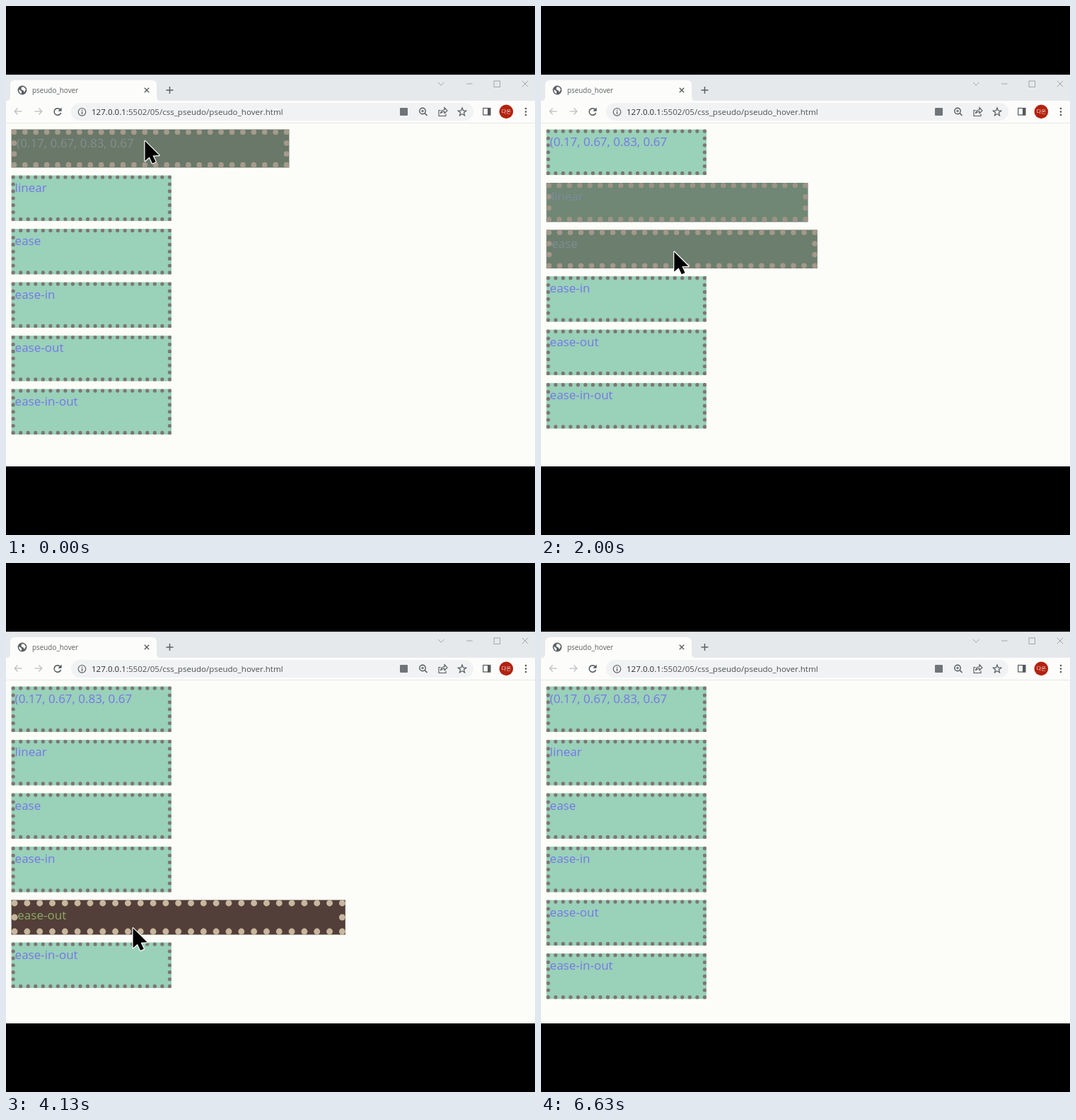
Recreate the animation shown at these times as an HTML page with a canvas. Size 748 by 748 pixels, loop 6.66 s.

```html
<!DOCTYPE html>
<html lang="en">
<head>
<meta charset="utf-8">
<title>pseudo_hover</title>
<style>
html, body { margin: 0; width: 100%; height: 100%; overflow: hidden; background: #000; }
canvas { display: block; width: 748px; height: 748px; }
</style>
</head>
<body>
<canvas id="stage" width="748" height="748"></canvas>
<script>
const ctx = document.getElementById('stage').getContext('2d');
const LOOP = 6660, STEP = 100 / 3, DURATION = 1450;
const SANS = '"Open Sans", "Noto Sans", sans-serif';

// label, timing curve, hover start, hover end
const boxes = [
  ['(0.17, 0.67, 0.83, 0.67', [0.17, 0.67, 0.83, 0.67], -402, 545],
  ['linear', [0, 0, 1, 1], 567, 1575],
  ['ease', [0.25, 0.1, 0.25, 1], 1617, 2449],
  ['ease-in', [0.42, 0, 1, 1], 2476, 3402],
  ['ease-out', [0, 0, 0.58, 1], 3403, 4345],
  ['ease-in-out', [0.42, 0, 0.58, 1], 4350, 5382]
];

// pointer height over time
const trail = [
  [0, 191], [400, 201], [545, 224], [570, 236], [800, 268], [1330, 271],
  [1480, 277], [1578, 298], [1620, 311], [1850, 346], [2300, 351], [2452, 371],
  [2490, 383], [2570, 413.5], [2750, 425], [3250, 431], [3402, 456], [3410, 467],
  [3570, 515.5], [4250, 516.5], [4345, 525], [4600, 565], [4770, 567],
  [5200, 568], [5385, 599], [5450, 656]
];

const lerp = (a, b, k) => a + (b - a) * k;

function bezier([x1, y1, x2, y2], x) {
  if (x <= 0) return 0;
  if (x >= 1) return 1;
  const at = (a, b, s) => 3 * (1 - s) * (1 - s) * s * a + 3 * (1 - s) * s * s * b + s * s * s;
  let lo = 0, hi = 1;
  for (let i = 0; i < 24; i++) {
    const mid = (lo + hi) / 2;
    if (at(x1, x2, mid) < x) lo = mid; else hi = mid;
  }
  return at(y1, y2, lo);
}

// transition value, with the shortened way back after an interruption
function progress([, curve, start, end], t) {
  const rise = bezier(curve, (Math.min(t, end) - start) / DURATION);
  if (t <= end) return rise;
  return rise * (1 - bezier(curve, (t - end) / (DURATION * rise)));
}

// blend two colours, each channel with its own power of p
function mix(from, to, p, powers) {
  const c = from.map((v, i) => Math.round(Math.max(0, Math.min(255, lerp(v, to[i], p ** powers[i])))));
  return `rgb(${c})`;
}

function rect(x, y, w, h, color) {
  ctx.fillStyle = color;
  ctx.fillRect(x, y, w, h);
}

function pill(x, y, w, h, r, color) {
  ctx.fillStyle = color;
  ctx.beginPath();
  ctx.roundRect(x, y, w, h, r);
  ctx.fill();
}

function disc(x, y, r, color) {
  ctx.fillStyle = color;
  ctx.beginPath();
  ctx.arc(x, y, r, 0, Math.PI * 2);
  ctx.fill();
}

function ring(x, y, r, color, width = 1.2) {
  ctx.strokeStyle = color;
  ctx.lineWidth = width;
  ctx.beginPath();
  ctx.arc(x, y, r, 0, Math.PI * 2);
  ctx.stroke();
}

function line(points, color, width = 1.2) {
  ctx.strokeStyle = color;
  ctx.lineWidth = width;
  ctx.beginPath();
  points.forEach(([x, y]) => ctx.lineTo(x, y));
  ctx.stroke();
}

function text(str, x, y, size, color, align = 'left') {
  ctx.font = `${size}px ${SANS}`;
  ctx.textAlign = align;
  ctx.fillStyle = color;
  ctx.fillText(str, x, y);
}

function cross(x, y, r, color, width) {
  line([[x - r, y - r], [x + r, y + r]], color, width);
  line([[x - r, y + r], [x + r, y - r]], color, width);
}

function plus(x, y, r, color, width) {
  line([[x - r, y], [x + r, y]], color, width);
  line([[x, y - r], [x, y + r]], color, width);
}

function arrow(x, y, dir, color) {
  line([[x - 5 * dir, y], [x + 5 * dir, y]], color, 1.3);
  line([[x + dir, y - 4.5], [x + 5.3 * dir, y], [x + dir, y + 4.5]], color, 1.3);
}

function drawTabs() {
  const gray = '#5b5f62', pale = '#a3a6a8';
  rect(0, 97, 748, 38, '#e6e9ec');
  rect(0, 97, 748, 1, '#c9cccf');
  ctx.fillStyle = '#fcfdfb';
  ctx.beginPath();
  ctx.moveTo(0, 135);
  ctx.quadraticCurveTo(6, 134, 6, 128);
  ctx.lineTo(6, 112);
  ctx.quadraticCurveTo(6, 105, 13, 105);
  ctx.lineTo(206, 105);
  ctx.quadraticCurveTo(213, 105, 213, 112);
  ctx.lineTo(213, 128);
  ctx.quadraticCurveTo(213, 134, 220, 135);
  ctx.fill();

  disc(23, 119, 6.4, gray);
  ctx.fillStyle = '#fcfdfb';
  ctx.beginPath();
  ctx.moveTo(18.3, 118);
  ctx.lineTo(22, 120.5);
  ctx.lineTo(22, 124);
  ctx.quadraticCurveTo(18, 123, 18.3, 118);
  ctx.moveTo(22, 114.5);
  ctx.lineTo(25.5, 114.5);
  ctx.lineTo(28, 118);
  ctx.lineTo(26, 122);
  ctx.lineTo(24.5, 119.5);
  ctx.lineTo(21.5, 118);
  ctx.fill();
  text('pseudo_hover', 37, 122.7, 9.9, '#5c5f61');
  cross(199, 119, 3.2, gray, 1.4);
  plus(231.5, 119, 5, gray, 1.5);

  line([[611, 108], [615.2, 112.3], [619.4, 108]], pale, 1);
  line([[651, 110], [659.5, 110]], pale, 1);
  ctx.strokeRect(690, 106, 8.5, 8.5);
  cross(734, 110, 4.2, pale, 1);
}

function drawToolbar() {
  const dark = '#55595c', pale = '#bcbfc1';
  rect(0, 134, 748, 32, '#fcfdfb');
  rect(0, 165, 748, 1, '#e6e8e8');
  arrow(17.5, 149, -1, pale);
  arrow(45.5, 149, 1, pale);

  ctx.strokeStyle = dark;
  ctx.lineWidth = 1.5;
  ctx.beginPath();
  ctx.arc(73, 149.5, 4.8, 0.3, 5.5);
  ctx.stroke();
  ctx.fillStyle = dark;
  ctx.beginPath();
  ctx.moveTo(78.6, 143.5);
  ctx.lineTo(78.6, 148.7);
  ctx.lineTo(73.4, 148.7);
  ctx.fill();

  pill(92, 137, 569, 25, 12.5, '#f0f2f3');
  ring(107.5, 149.8, 5.3, dark, 1.1);
  rect(106.9, 149, 1.3, 3.8, dark);
  rect(106.9, 146.7, 1.3, 1.3, dark);
  const host = '127.0.0.1';
  text(host, 121, 154, 11.57, '#2b2d2f');
  text(':5502/05/css_pseudo/pseudo_hover.html', 121 + ctx.measureText(host).width, 154, 11.57, '#4d5053');

  pill(557, 144, 11, 11, 1, '#707478');

  ring(589, 148.5, 4.2, dark, 1.4);
  line([[592, 151.5], [595.5, 155]], dark, 1.6);
  plus(589, 148.5, 2, dark, 1);

  line([[614.5, 147.5], [612, 147.5], [612, 155.5], [622, 155.5], [622, 152.5]], dark, 1.1);
  ctx.beginPath();
  ctx.moveTo(614.5, 152);
  ctx.quadraticCurveTo(615, 147, 620, 146.7);
  ctx.lineTo(620, 143.7);
  ctx.lineTo(624, 148);
  ctx.lineTo(620, 151.7);
  ctx.lineTo(620, 149.2);
  ctx.quadraticCurveTo(616.5, 149, 614.5, 152);
  ctx.stroke();

  ctx.lineWidth = 1.2;
  ctx.beginPath();
  for (let i = 0; i < 10; i++) {
    const r = i % 2 ? 2.6 : 6, a = i * Math.PI / 5 - Math.PI / 2;
    ctx.lineTo(645 + r * Math.cos(a), 150 + r * Math.sin(a));
  }
  ctx.closePath();
  ctx.stroke();

  ctx.strokeRect(674.7, 144.5, 10, 9.5);
  rect(681, 144, 4.3, 10.5, dark);
  disc(707.3, 149.4, 9.8, '#b3220f');
  text('다온', 707.3, 152.3, 7.5, '#f6dcd6', 'center');
  for (const y of [145, 149.5, 154]) disc(735, y, 1.3, dark);
}

function dotRow(x, y, length, size, vertical) {
  const fit = n => (length - n * size) / (n - 1);
  const low = Math.floor((length + size) / (2 * size));
  const few = fit(low), many = fit(low + 1);
  const useFew = many <= 0 || Math.abs(few - size) < Math.abs(many - size);
  const n = useFew ? low : low + 1, pitch = size + (useFew ? few : many), r = size / 2;
  for (let i = 0; i < n; i++) {
    const d = r + i * pitch;
    const cx = x + (vertical ? r : d), cy = y + (vertical ? d : r);
    ctx.moveTo(cx + r, cy);
    ctx.arc(cx, cy, r, 0, Math.PI * 2);
  }
}

function drawBox(label, top, p) {
  const x = 7.6, w = 226.4 + 357 * p, h = 64.5 - 22.5 * p, b = 5.2 + 5.4 * p;
  rect(x, top, w, h, mix([153, 209, 185], [52, -23, -11], p, [0.97, 1.25, 1.15]));
  ctx.fillStyle = mix([125, 118, 116], [255, 232, 188], p, [1.5, 1.5, 1.5]);
  ctx.beginPath();
  dotRow(x, top, w, b, false);
  dotRow(x, top + h - b, w, b, false);
  dotRow(x, top, h, b, true);
  dotRow(x + w - b, top, h, b, true);
  ctx.fill();
  text(label, x + b - 0.2, top + b + 18.1, 17, mix([118, 118, 232], [164, 222, 30], p, [1.8, 1.8, 1.1]));
  return top + h + 11;
}

function drawPointer(t) {
  const next = trail.findIndex(k => k[0] > t);
  if (next < 1) return;
  const [t0, y0] = trail[next - 1], [t1, y1] = trail[next];
  const y = lerp(y0, y1, (t - t0) / (t1 - t0));
  ctx.save();
  ctx.translate(196.5 - (y - 191) * 0.052, y);
  ctx.beginPath();
  for (const [px, py] of [[0, 0], [0, 28], [6.3, 22.5], [10.5, 31.5], [15.3, 29.5], [11, 20.5], [20, 20]]) ctx.lineTo(px, py);
  ctx.closePath();
  ctx.lineJoin = 'round';
  ctx.lineWidth = 2.4;
  ctx.strokeStyle = '#fff';
  ctx.stroke();
  ctx.fillStyle = '#000';
  ctx.fill();
  ctx.restore();
}

function draw(t) {
  rect(0, 0, 748, 748, '#000');
  ctx.save();
  ctx.beginPath();
  ctx.rect(0, 97, 748, 554);
  ctx.clip();
  rect(0, 97, 748, 554, '#fcfdf9');
  drawTabs();
  drawToolbar();
  let top = 174.5;
  for (const box of boxes) top = drawBox(box[0], top, progress(box, t));
  drawPointer(t);
  ctx.restore();
}

function tick(now) {
  const t = now % LOOP;
  draw(Math.floor((t + 3.4) / STEP) * STEP);
  requestAnimationFrame(tick);
}
tick(performance.now());
</script>
</body>
</html>
```
